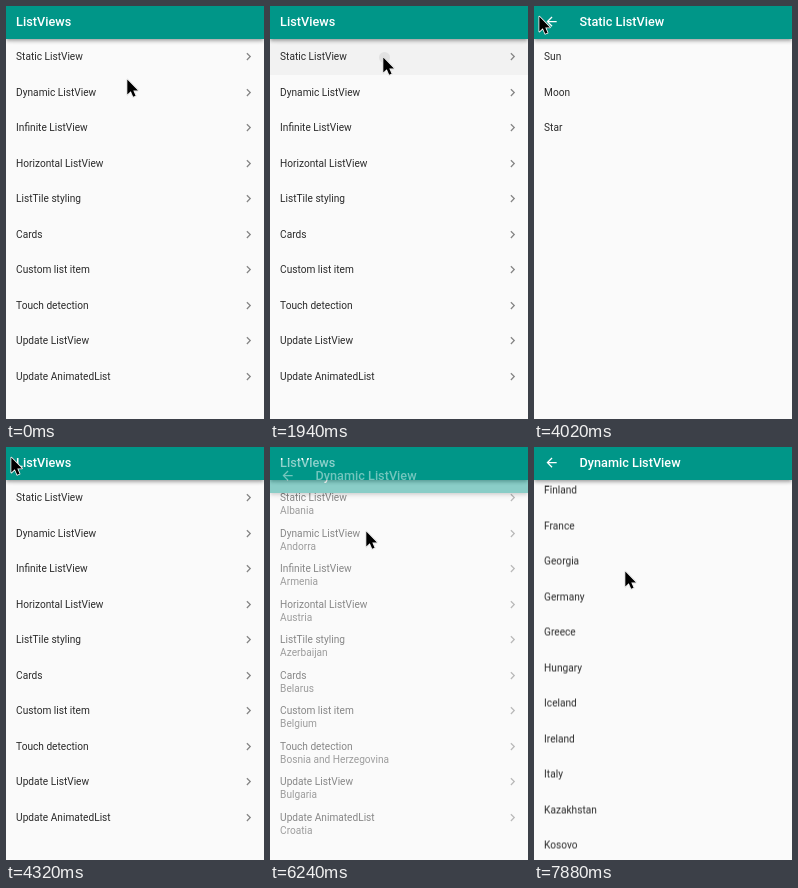
These frames come from a looping animation (258x413 px, 8 s). An HTML page:

```html
<!DOCTYPE html>
<html lang="en">
<head>
<meta charset="utf-8">
<title>List views</title>
<style>
  html, body { margin: 0; width: 100%; height: 100%; overflow: hidden; background: #fafafa; }
  #stage { position: relative; width: 258px; height: 413px; overflow: hidden; font-family: Roboto, sans-serif; }
  .page { position: absolute; inset: 0; overflow: hidden; background: #fafafa; }
  .covered { opacity: 0; }
  .bar {
    position: absolute; left: 0; top: 0; width: 258px; height: 33px;
    background: #009688; color: #fff; font-size: 12.68px; font-weight: 500; line-height: 32px;
    box-shadow: 0 1.3px 2.5px -.6px #0003, 0 2.5px 3.2px #00000024, 0 .6px 6.3px #0000001f;
  }
  .bar span { position: absolute; left: 10.1px; white-space: nowrap; }
  .bar svg + span { left: 45.6px; }
  .bar svg { position: absolute; left: 10px; top: 8.4px; width: 15.2px; height: 15.2px; fill: #fff; }
  .list { position: absolute; left: 0; top: 33.25px; width: 258px; }
  .row {
    position: relative; height: 35.5px; line-height: 35.5px; padding-left: 10.1px;
    font-size: 10.14px; color: rgba(0, 0, 0, .83); white-space: nowrap;
  }
  .row svg { position: absolute; left: 235.2px; top: 10.1px; width: 15.2px; height: 15.2px; fill: #858585; }
  .press { position: absolute; left: 0; width: 258px; height: 35.5px; background: #f2f2f2; opacity: 0; }
  .press i { position: absolute; width: 11px; height: 11px; border-radius: 50%; background: #e2e2e2; }
  #cursor { position: absolute; left: -2px; top: -2px; width: 18px; height: 24px; overflow: visible;
    filter: drop-shadow(0 .7px .7px rgba(0, 0, 0, .3)); }
</style>
</head>
<body>
<div id="stage"></div>
<script>
const LOOP = 8000;
const ROW = 35.5;
const stage = document.getElementById('stage');

const topics = ['Static ListView', 'Dynamic ListView', 'Infinite ListView', 'Horizontal ListView',
  'ListTile styling', 'Cards', 'Custom list item', 'Touch detection', 'Update ListView', 'Update AnimatedList'];
const bodies = ['Sun', 'Moon', 'Star'];
const countries = ['Albania', 'Andorra', 'Armenia', 'Austria', 'Azerbaijan', 'Belarus', 'Belgium',
  'Bosnia and Herzegovina', 'Bulgaria', 'Croatia', 'Cyprus', 'Czech Republic', 'Denmark', 'Estonia',
  'Finland', 'France', 'Georgia', 'Germany', 'Greece', 'Hungary', 'Iceland', 'Ireland', 'Italy',
  'Kazakhstan', 'Kosovo', 'Latvia'];

const icon = d => `<svg viewBox="0 0 24 24"><path d="${d}"/></svg>`;
const chevron = icon('M8.59 16.59 13.17 12 8.59 7.41 10 6l6 6-6 6z');
const back = icon('M20 11H7.83l5.59-5.59L12 4l-8 8 8 8 1.41-1.41L7.83 13H20z');

function add(html) {
  stage.insertAdjacentHTML('beforeend', html);
  return stage.lastElementChild;
}

function addPage(title, items, isHome) {
  const rows = items.map(t => `<div class="row">${t}${isHome ? chevron : ''}</div>`).join('');
  return add(`<div class="page ${isHome ? '' : 'covered'}"><div class="list">${rows}</div>
    <div class="bar">${isHome ? '' : back}<span>${title}</span></div></div>`);
}

// Each step is [time, style] and holds until the next one.
function play(el, steps) {
  const frames = steps.map(([t, style]) => ({ offset: t / LOOP, easing: 'steps(1, end)', ...style }));
  frames.push({ offset: 1, ...steps[steps.length - 1][1] });
  el.animate(frames, { duration: LOOP, iterations: Infinity });
}

const shift = (x, y) => ({ transform: `translate(${x}px, ${y}px)` });
const fade = (opacity, y = 0) => ({ opacity, ...shift(0, y) });

const home = addPage('ListViews', topics, true);
const fixed = addPage('Static ListView', bodies);
const dynamic = addPage('Dynamic ListView', countries);

function addPress(index, x, y, from, to) {
  const top = index * ROW;
  const list = home.querySelector('.list');
  list.insertAdjacentHTML('afterbegin', `<div class="press" style="top:${top}px">
    <i style="left:${x - 5.5}px;top:${y - 38.75 - top}px"></i></div>`);
  play(list.firstElementChild, [[0, { opacity: 0 }], [from, { opacity: 1 }], [to, { opacity: 0 }]]);
}

addPress(0, 114, 51, 1940, 2090);
addPress(1, 97, 85, 6100, 6240);

play(fixed, [[0, fade(0, 13)], [2090, fade(.45, 13)], [2240, fade(1)], [4170, fade(.45, 13)], [4320, fade(0, 13)]]);
play(dynamic, [[0, fade(0, 13)], [6240, fade(.45, 13)], [6390, fade(1)]]);
play(dynamic.querySelector('.list'),
  [[0, 0], [7580, -60], [7730, -260], [7880, -504.5]].map(([t, y]) => [t, shift(0, y)]));

const cursor = add(`<svg id="cursor" viewBox="-2 -2 18 24">
  <path d="M.3.6V15.6L3.8 12.3 6.2 17.8 8.6 16.8 6.3 11.4H11z"
    fill="#000" stroke="#fff" stroke-width="1.6" paint-order="stroke" stroke-linejoin="round"/></svg>`);

play(cursor, [
  [0, 121, 73], [150, 118, 66], [290, 114, 55], [440, 113, 51],
  [3290, 97, 44], [3440, 52, 26], [3590, 15, 13], [3730, 5, 10],
  [4620, 12, 18], [4770, 38, 48], [4910, 66, 76], [5060, 84, 92], [5210, 92, 93], [5350, 96, 87], [5500, 96, 84],
  [6990, 94, 130], [7140, 90, 225], [7290, 89, 254],
  [7580, 90, 194], [7730, 91, 124]
].map(([t, x, y]) => [t, shift(x, y)]));
</script>
</body>
</html>
```
